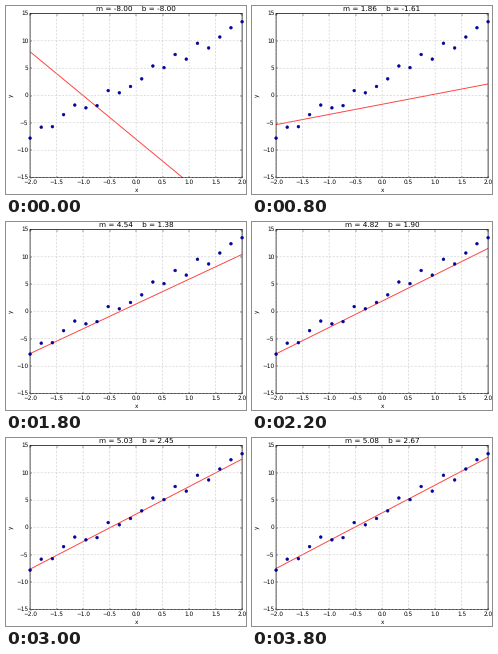
A matplotlib script for the animation above (4 s loop, 240x188 px).

```python
import numpy as np
import matplotlib.pyplot as plt
from matplotlib.animation import FuncAnimation

W, H, DPI = 240, 188, 32
FRAMES, INTERVAL = 20, 200
PT = 1.0684  # one point of the plot's own scale at this DPI

plt.style.use("classic")
plt.rcParams.update({
    "font.family": "DejaVu Sans",
    "font.size": 12 * PT,
    "text.hinting": "none",
    "axes.linewidth": 1.5 * PT,
    "axes.titlepad": 5 * PT,
    "axes.labelpad": 5 * PT,
    "grid.linewidth": 0.9 * PT,
    "path.snap": False,
})
for axis in ("xtick", "ytick"):
    plt.rcParams.update({
        f"{axis}.major.size": 4 * PT,
        f"{axis}.major.width": 0.8 * PT,
        f"{axis}.major.pad": 4 * PT,
    })

# Noisy samples along a straight line
x = np.linspace(-2, 2, 20)
y = np.array([-7.8, -5.8, -5.7, -3.5, -1.75, -2.25, -1.85, 0.9, 0.5, 1.65,
              3.05, 5.4, 5.1, 7.5, 6.65, 9.55, 8.7, 10.7, 12.4, 13.5])

# Gradient descent: x has zero mean, so m and b converge independently
RATE = 0.2
START = -8.0
M_FIT, B_FIT = 5.1018, 2.829


def descend(fit, curvature, step):
    return fit + (START - fit) * (1 - RATE * curvature) ** step


fig = plt.figure(figsize=(W / DPI, H / DPI), dpi=DPI, facecolor="white")
left, right, top, bottom = 24.1, 236.1, 7.5, 171.5
ax = fig.add_axes([left / W, 1 - bottom / H, (right - left) / W, (bottom - top) / H])
ax.set(xlim=(-2, 2), ylim=(-15, 15), xlabel="x", ylabel="y")
ax.grid(True, color="#b8b8b8", linestyle=(0, (4.6, 3.4)))
# Per-point widths keep the dots at sub-pixel positions
ax.scatter(x, y, s=(6 * PT) ** 2, color="#0000b4", edgecolors="#000070",
           linewidths=np.full(x.size, 0.9 * PT), clip_on=False, zorder=3)
line, = ax.plot([], [], color="#ff4040", linewidth=2 * PT, zorder=2.5)
title = ax.set_title("", fontsize=15.2 * PT)
ends = np.array([-2.0, 2.0])


def update(step):
    m = descend(M_FIT, np.mean(x ** 2), step)
    b = descend(B_FIT, 1, step)
    line.set_data(ends, m * ends + b)
    title.set_text(f"m = {m:.2f}    b = {b:.2f}")
    return line, title


anim = FuncAnimation(fig, update, frames=FRAMES, interval=INTERVAL,
                     repeat=True, repeat_delay=0)
plt.show()
```
